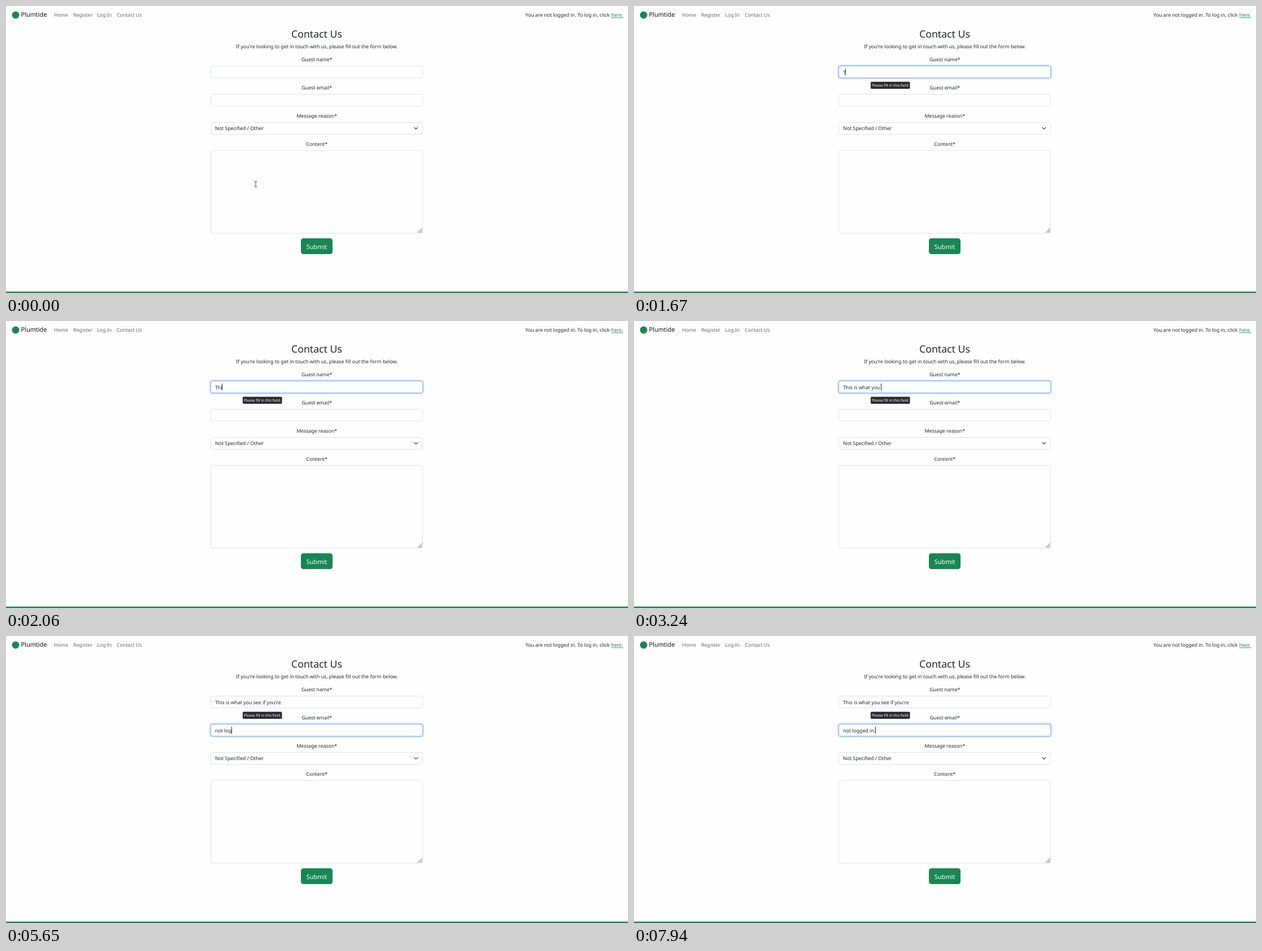
An HTML page that plays this animation: 1101 by 509 pixels, repeating every 8000 ms.

```html
<!DOCTYPE html>
<html lang="en">
<head>
<meta charset="utf-8">
<title>Contact form</title>
<style>
  html, body { margin: 0; width: 100%; height: 100%; overflow: hidden; background: #fefefe; }
  svg { display: block; width: 1101px; height: 509px; }
  text { font: 8.74px "Noto Sans", "Open Sans", sans-serif; fill: #212529; text-rendering: geometricPrecision; }
  .nav text { fill: #636465; }
  .mid { text-anchor: middle; }
  .big { font-size: 10.9px; }
  .box { fill: #fefefe; stroke: #dee2e6; }
  .focus { stroke: #86b7fe; }
  .ring { fill: #c2dbfe; }
  .green { fill: #198754; }
</style>
</head>
<body>
<svg viewBox="0 0 1101 509">
  <circle class="green" cx="17" cy="16" r="6.5"/>
  <text class="big" x="26.5" y="19.2" style="fill:#111">Plumtide</text>
  <g class="nav">
    <text x="85" y="19.4">Home</text>
    <text x="119" y="19.4">Register</text>
    <text x="161.3" y="19.4">Log In</text>
    <text x="196" y="19.4">Contact Us</text>
  </g>
  <text x="919.4" y="19.4">You are not logged in. To log in, click</text>
  <text class="green" x="1092.3" y="19.4" text-anchor="end" text-decoration="underline">here.</text>

  <text class="mid" x="550" y="56" style="font-size:17.65px">Contact Us</text>
  <text class="mid" x="550.3" y="74.9">If you're looking to get in touch with us, please fill out the form below.</text>
  <text class="mid" x="550.2" y="98.2">Guest name*</text>
  <text class="mid" x="550.2" y="148">Guest email*</text>
  <text class="mid" x="550.2" y="197.8">Message reason*</text>
  <text class="mid" x="550.2" y="247.6">Content*</text>

  <g id="fields"></g>

  <rect class="box" x="362.5" y="206.5" width="375" height="21" rx="3.5"/>
  <text x="370" y="220.4">Not Specified / Other</text>
  <path d="M722.8 215.4l2.9 2.9 2.9-2.9" fill="none" stroke="#343a40" stroke-width="1.15" stroke-linecap="round" stroke-linejoin="round"/>
  <rect class="box" x="362.5" y="256" width="375" height="147" rx="3.5"/>
  <path d="M728.8 402l7.7-7.7M731.8 402l4.7-4.7M734.6 402l1.9-1.9" stroke="#666" stroke-width="1"/>

  <rect class="green" x="522" y="412" width="56" height="28" rx="4.5"/>
  <text class="mid big" x="550" y="430.9" style="fill:#fff">Submit</text>
  <rect class="green" y="506.5" width="1101" height="2.5"/>

  <g id="tip">
    <rect x="419.4" y="134.9" width="68.6" height="11.4" rx="1" fill="#2b2a33" stroke="#1c1b22" stroke-width=".9"/>
    <text x="420.9" y="143" style="font-size:6.55px;fill:#fbfbfe">Please fill in this field.</text>
  </g>
  <rect id="caret" y="111" width="1" height="12" fill="#222"/>
  <path id="beam" d="M-2.5-4.9H-.6L0-4.4.6-4.9H2.5M0-4.4V4.4M-2.5 4.9H-.6L0 4.4.6 4.9H2.5" fill="none" stroke="#333" stroke-width=".9"/>
  <path id="arrow" d="M.4.4V10L2.6 8 4 11 5.4 10.4 4.1 7.4H7Z" fill="#fff" stroke="#222" stroke-width=".7"/>
</svg>
<script>
const LOOP = 8000;
const TEXT_X = 370;
const $ = id => document.getElementById(id);

// Typing: [time, characters visible]
const inputs = [
  {
    top: 106.5, text: "This is what you see if you're", focus: [1160, 4880],
    keys: [[1670, 1], [1800, 2], [1940, 3], [2180, 4], [2300, 5], [2580, 7], [2730, 10], [2860, 12],
      [3000, 14], [3120, 16], [3240, 17], [3360, 19], [3610, 20], [3730, 21], [3850, 23],
      [3970, 24], [4090, 25], [4210, 27], [4490, 29], [4630, 30]]
  },
  {
    top: 156.5, text: "not logged in.", focus: [4880, LOOP],
    keys: [[5140, 1], [5260, 2], [5380, 4], [5510, 5], [5650, 7], [5940, 8],
      [6080, 9], [6200, 10], [6320, 11], [6440, 13], [6810, 14]]
  }
];

// Pointer: [time, shape, x, y]
const pointer = [
  [0, "beam", 442, 316], [250, "beam", 440.5, 296], [370, "beam", 432, 262],
  [490, "arrow", 421, 188], [610, "arrow", 417.6, 134.2],
  [760, "beam", 421.2, 126.5], [880, "beam", 421.2, 124.4], [1670, "none", 0, 0]
];

const latest = (steps, t) => steps.filter(s => s[0] <= t).pop();
const within = (t, [from, to]) => t >= from && t < to;
const show = (el, on) => el.setAttribute("visibility", on ? "visible" : "hidden");

function add(tag, attrs) {
  const el = document.createElementNS($("fields").namespaceURI, tag);
  for (const name in attrs) el.setAttribute(name, attrs[name]);
  return $("fields").appendChild(el);
}

for (const field of inputs) {
  const y = field.top;
  field.ring = add("rect", { class: "ring", x: 360.2, y: y - 2.3, width: 379.6, height: 25.6, rx: 5.5 });
  field.box = add("rect", { class: "box", x: 362.5, y, width: 375, height: 21, rx: 3.5 });
  field.label = add("text", { x: TEXT_X, y: y + 14.1 });
}

function drawField(field, t) {
  const count = (latest(field.keys, t) || [0, 0])[1];
  const typed = field.text.slice(0, count).replace(/ /g, "\u00a0");
  if (field.label.textContent !== typed) field.label.textContent = typed;
  const focused = within(t, field.focus);
  show(field.ring, focused);
  field.box.classList.toggle("focus", focused);
}

function drawCaret(t) {
  const field = inputs[t < 4750 ? 0 : 1];
  const width = field.label.textContent ? field.label.getComputedTextLength() : 0;
  $("caret").setAttribute("x", Math.round(TEXT_X + width - 0.4));
  $("caret").setAttribute("y", field.top + 4.5);
  show($("caret"), t >= 1160 && !within(t, [7320, 7940]));
}

function drawPointer(t) {
  const [, shape, x, y] = latest(pointer, t);
  for (const id of ["beam", "arrow"]) {
    show($(id), id === shape);
    $(id).setAttribute("transform", `translate(${x} ${y})`);
  }
}

function frame(now) {
  const t = (now - start) % LOOP;
  inputs.forEach(field => drawField(field, t));
  drawCaret(t);
  drawPointer(t);
  show($("tip"), t >= 1670);
  requestAnimationFrame(() => frame(performance.now()));
}

const start = performance.now();
frame(start);
</script>
</body>
</html>
```
